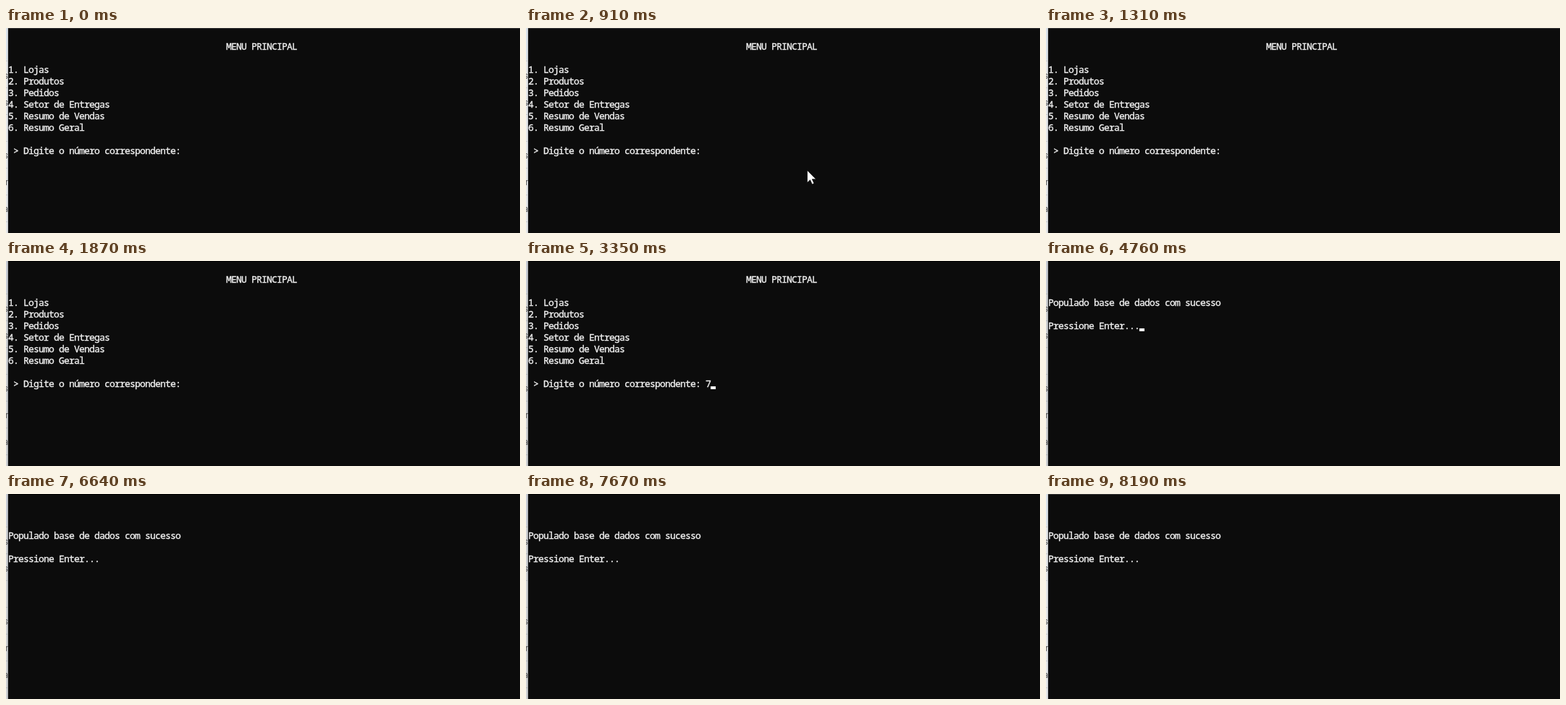
An HTML page with a canvas that plays this animation: 710x283 px, repeating every 8.35 s.

```html
<!DOCTYPE html>
<html lang="pt">
<head>
<meta charset="utf-8">
<title>Menu principal</title>
<style>
html, body { margin: 0; height: 100%; overflow: hidden; background: #0c0c0c; }
canvas { display: block; }
</style>
</head>
<body>
<canvas id="stage" width="710" height="283"></canvas>
<script>
const ctx = document.getElementById('stage').getContext('2d');
const LOOP = 8350, LEFT = 3, CELL = 7, LINE = 16, TOP = 30;
const FOCUS = 1870, TYPED = 3350, ENTER = 4680, CLEARED = 4760, BLUR = 8190;
const BLINK_START = 2400, BLINK = 526;
const POINTER_IN = 760, POINTER_OUT = 1085, POINTER_STEP = 75;
const PROMPT = ' > Digite o número correspondente: ';
const MENU = ['Lojas', 'Produtos', 'Pedidos', 'Setor de Entregas', 'Resumo de Vendas', 'Resumo Geral'];

const clamp = v => Math.min(1, Math.max(0, v));

function rect(x, y, w, h, color) {
  ctx.fillStyle = color;
  ctx.fillRect(x, y, w, h);
}

function print(text, row, col = 0) {
  const x = LEFT + col * CELL, y = TOP + row * LINE;
  ctx.fillText(text, x, y);
  ctx.strokeText(text, x, y);
}

// Sliver of the page behind the terminal
function drawBackdrop(focused) {
  rect(0, 0, LEFT, 283, focused ? '#cfd1d4' : '#e6e8ea');
  rect(0, 0, LEFT, 44, focused ? '#c8ccd6' : '#dae3ec');
  for (let y = 45; y < 283; y += 37) rect(0, y, LEFT, 1, focused ? '#b4b7b9' : '#c8cacc');
  rect(2, 0, 1, 283, focused ? '#a9abad' : '#c4c6c8');
  ctx.font = '12px Roboto, sans-serif';
  ctx.letterSpacing = '0px';
  ctx.textAlign = 'right';
  ctx.fillStyle = '#555';
  [...'ss sra'].forEach((c, i) => ctx.fillText(c, LEFT, 70 + i * 36.7));
}

function drawPointer(t) {
  const step = start => Math.floor((t - start) / POINTER_STEP);
  const away = clamp(1 - step(POINTER_IN) / 2);
  const leave = clamp(step(POINTER_OUT) / 3);
  if (t < POINTER_IN || leave === 1) return;
  ctx.save();
  ctx.translate(388.5 + 37 * away + 10 * leave, 196.5 + 69 * away + 88 * leave);
  const arrow = new Path2D('M0 0V17L4 13.2 6.8 19.2 9.4 18 6.7 12.2H12Z');
  ctx.fillStyle = '#fff';
  ctx.fill(arrow);
  ctx.strokeStyle = '#000';
  ctx.lineWidth = 0.6;
  ctx.stroke(arrow);
  ctx.restore();
}

// A key press shows the caret at once and shifts the blink phase.
function caretVisible(t, focused) {
  if (!focused || t < BLINK_START) return false;
  const beat = Math.floor((t - BLINK_START) / BLINK) + (t >= TYPED);
  const justEntered = t >= ENTER && t < ENTER + BLINK;
  return justEntered || beat % 2 === 0;
}

function draw(t) {
  const focused = t >= FOCUS && t < BLUR;
  drawBackdrop(focused);
  rect(LEFT, 0, 707, 283, '#0c0c0c');
  rect(LEFT, 0, 707, 1, focused ? '#000' : '#363636');

  ctx.font = '500 13px "Noto Sans Mono", monospace';
  ctx.letterSpacing = '-0.8px';
  ctx.textAlign = 'left';
  ctx.fillStyle = ctx.strokeStyle = '#f2f2f2';
  ctx.lineWidth = 0.35;
  let caret;
  if (t < CLEARED) {
    const input = PROMPT + (t >= TYPED ? '7' : '');
    print('MENU PRINCIPAL', 0, 43);
    MENU.forEach((name, i) => print(`${i + 1}. ${name}`, i + 2));
    print(input, 9);
    caret = t >= ENTER ? [0, 10] : [input.length, 9];
  } else {
    const pause = 'Pressione Enter...';
    print('Populado base de dados com sucesso', 2);
    print(pause, 4);
    caret = [pause.length, 4];
  }
  if (caretVisible(t, focused)) {
    rect(LEFT + caret[0] * CELL, TOP + caret[1] * LINE - 1, CELL, 4, '#fff');
  }
  drawPointer(t);
}

function tick() {
  draw(performance.now() % LOOP);
  requestAnimationFrame(tick);
}
tick();
</script>
</body>
</html>
```
